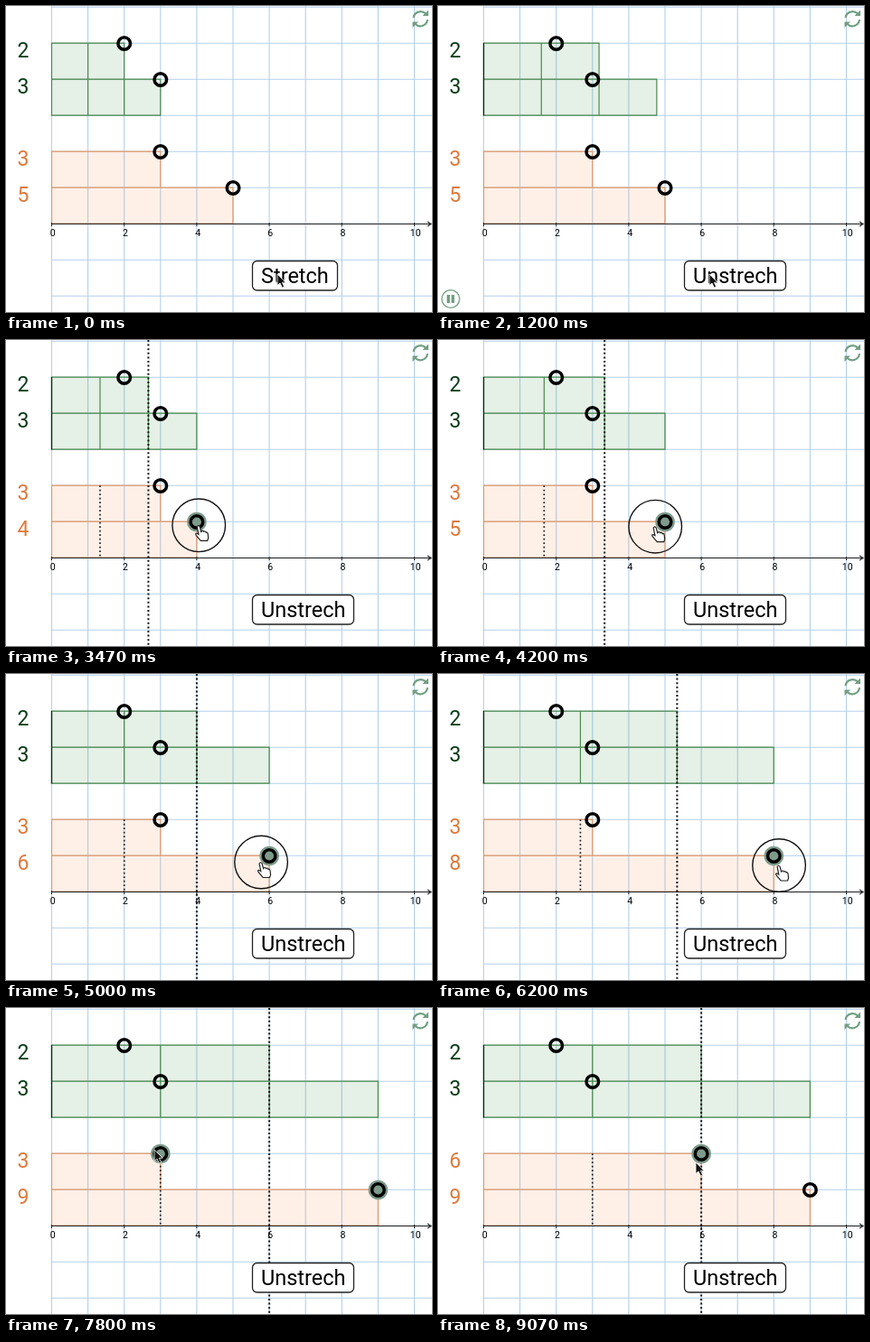
Write an HTML page that moves like this. It is 471 px wide and 339 px high and loops after 9.14 s.

```html
<!DOCTYPE html>
<html lang="en">
<head>
<meta charset="utf-8">
<title>Stretching bars</title>
<style>
  html, body { margin: 0; width: 100%; height: 100%; overflow: hidden; background: #fff; }
  svg { display: block; font-family: Roboto, sans-serif; }
  .grid { stroke: #b3d0eb; stroke-width: 1.1; }
  .green { fill: rgba(20, 120, 30, .11); stroke: #4a8b4d; stroke-width: 1.2; }
  .orange { fill: rgba(240, 120, 40, .11); stroke: #e39a6b; stroke-width: 1.2; }
  .ring { fill: none; stroke: #000; stroke-width: 3.5; }
  .halo { fill: #7d9b8b; }
  .count { font-size: 23px; }
  .tick { font-size: 10.5px; text-anchor: middle; }
  .icon { fill: none; stroke: #729f83; }
</style>
</head>
<body>
<svg width="471" height="339" viewBox="0 0 471 339">
  <g id="grid" class="grid"></g>
  <path id="green" class="green"/>
  <path id="edge" d="M50.5 41V121.5" stroke="#142a16" stroke-width="1.3"/>
  <path id="orange" class="orange"/>
  <g id="axis"></g>
  <path id="unitLine" stroke="#222" stroke-width="1.7" stroke-dasharray="1.7 2.8"/>
  <path id="guide" stroke="#111" stroke-width="2" stroke-dasharray="2 2.6"/>
  <g id="points"></g>
  <g class="count" fill="#0c3d18">
    <text x="12.5" y="57">2</text>
    <text x="12.5" y="97">3</text>
  </g>
  <g class="count" fill="#dd7a3c">
    <text id="topCount" x="12.5" y="177">3</text>
    <text id="lowCount" x="12.5" y="217">5</text>
  </g>
  <g id="button">
    <rect id="frame" x="272.5" y="282.5" height="32.5" rx="5" fill="#fff" stroke="#222" stroke-width="1.3"/>
    <text id="caption" x="282" y="307" font-size="23.5"></text>
  </g>
  <g class="icon" stroke-width="2.2">
    <path d="M450.5 13A8 8 0 0 1 464 8.5M466 15A8 8 0 0 1 452.5 20"/>
    <path d="M467 4.5V11H460.5ZM449.5 24V17.5H456Z" fill="#729f83" stroke="none"/>
  </g>
  <g id="pause" class="icon">
    <circle cx="14" cy="324.5" r="9.8" stroke-width="1.3"/>
    <path d="M11.5 320V329M16.5 320V329" stroke-width="3.4"/>
  </g>
  <circle id="press" r="29.3" fill="none" stroke="#111" stroke-width="1.4"/>
  <path id="arrow" d="M0 0V12.5L3 10L5.3 15L7.6 14L5.4 9.2H9.2Z" fill="#111" stroke="#fff" stroke-width=".8"/>
  <path id="hand" d="M-2 1.5Q-.5 -1 1 1.5L2.5 7Q4 5 5.5 7Q7 6 8 8Q9.5 7 10 9.5L10.5 14L9.5 17H2L-3 11Q-4.5 8.5 -2 9L-.3 10Z" fill="#fff" stroke="#222" stroke-width="1.2"/>
</svg>
<script>
const LOOP = 9140, X0 = 50.5, UNIT = 40.1;
const CLICK = 200, STRETCHED = 1330;
const LOW_DRAG = [2500, 6900], TOP_DRAG = [8000, 8800];

// time, x, y
const POINTER = [
  [0, 300, 297], [1500, 300, 297], [2300, 250, 203], [2600, 250, 203],
  [3100, 212, 205], [3700, 214, 205.5], [5000, 282, 208.5], [6200, 377, 212],
  [6800, 411, 206], [7050, 411, 206], [7700, 164, 157], [7850, 164, 157],
  [8050, 170, 161], [8700, 290, 163], [9000, 285, 171], [LOOP, 285, 171]
];

const $ = id => document.getElementById(id);
const px = units => X0 + units * UNIT;
const rowY = row => 1.2 + row * 40;
const within = (t, [from, to]) => t >= from && t < to;
const show = (id, on) => $(id).setAttribute('visibility', on ? 'visible' : 'hidden');
const place = (node, x, y) => node.setAttribute('transform', `translate(${x} ${y})`);
const bar = (row, length) => `M${X0} ${rowY(row)}H${px(length)}V${rowY(row + 1)}H${X0}Z`;

function add(parent, tag, attrs, text = '') {
  const node = document.createElementNS('http://www.w3.org/2000/svg', tag);
  for (const name in attrs) node.setAttribute(name, attrs[name]);
  node.textContent = text;
  return $(parent).appendChild(node);
}

function buildStage() {
  for (let i = 0; i <= 10; i++) add('grid', 'path', { d: `M${px(i)} 0V339` });
  for (let i = 0; i <= 8; i++) add('grid', 'path', { d: `M${X0} ${rowY(i)}H471` });
  add('axis', 'path', { d: 'M50 241.5H469M466 239L470 241.5L466 244', fill: 'none', stroke: '#222', 'stroke-width': 1.1 });
  for (let i = 0; i <= 10; i += 2) {
    add('axis', 'path', { d: `M${px(i)} 240V244`, stroke: '#222' });
    add('axis', 'text', { x: px(i) + 1.2, y: 254.5, class: 'tick' }, i);
  }
}

function addPoint(units, row) {
  const group = add('points', 'g', {});
  const halo = document.createElementNS(group.namespaceURI, 'circle');
  const ring = halo.cloneNode();
  halo.setAttribute('class', 'halo');
  halo.setAttribute('r', 10.8);
  ring.setAttribute('class', 'ring');
  ring.setAttribute('r', 6.8);
  group.append(halo, ring);
  place(group, px(units), rowY(row) + .3);
  return (value, lit) => {
    place(group, px(value), rowY(row) + .3);
    halo.setAttribute('visibility', lit ? 'visible' : 'hidden');
  };
}

function pointerAt(t) {
  const i = POINTER.findIndex(key => key[0] > t);
  const [t0, x0, y0] = POINTER[i - 1], [t1, x1, y1] = POINTER[i];
  const p = (t - t0) / (t1 - t0);
  return [x0 + (x1 - x0) * p, y0 + (y1 - y0) * p];
}

// Dragged points snap to whole units.
function dragged(t, [from, to], start) {
  return t < from ? start : Math.round((pointerAt(Math.min(t, to))[0] - X0) / UNIT);
}

buildStage();
addPoint(2, 1)(2, false);
addPoint(3, 2)(3, false);
const setTop = addPoint(3, 4), setLow = addPoint(5, 5);

function render(t) {
  const top = dragged(t, TOP_DRAG, 3), low = dragged(t, LOW_DRAG, 5);
  const progress = Math.max(0, Math.min(1, (t - CLICK) / (STRETCHED - CLICK)));
  const scale = 1 + (low / 3 - 1) * progress;
  const clicked = t >= CLICK, stretched = t >= STRETCHED;
  const holding = within(t, LOW_DRAG) || within(t, TOP_DRAG);
  const [x, y] = pointerAt(t);

  $('green').setAttribute('d', bar(1, 2 * scale) + bar(2, 3 * scale) +
    `M${px(scale)} ${rowY(1)}V${rowY(3)}M${px(2 * scale)} ${rowY(2)}V${rowY(3)}`);
  $('orange').setAttribute('d', bar(4, top) + bar(5, low));
  $('unitLine').setAttribute('d', `M${px(scale)} ${rowY(4)}V${rowY(6)}`);
  $('guide').setAttribute('d', `M${px(2 * scale)} 0V339`);
  show('edge', clicked);
  show('unitLine', stretched);
  show('guide', stretched);
  show('pause', clicked && !stretched);

  $('topCount').textContent = top;
  $('lowCount').textContent = low;
  setTop(top, t >= 7650);
  setLow(low, within(t, [2200, TOP_DRAG[0]]));

  $('caption').textContent = clicked ? 'Unstrech' : 'Stretch';
  $('frame').setAttribute('width', clicked ? 112 : 94);

  for (const id of ['press', 'arrow', 'hand']) place($(id), x, y);
  show('press', holding);
  show('hand', holding);
  show('arrow', !holding);
}

const start = performance.now();
function tick() {
  render((performance.now() - start) % LOOP);
  requestAnimationFrame(tick);
}
tick();
</script>
</body>
</html>
```
